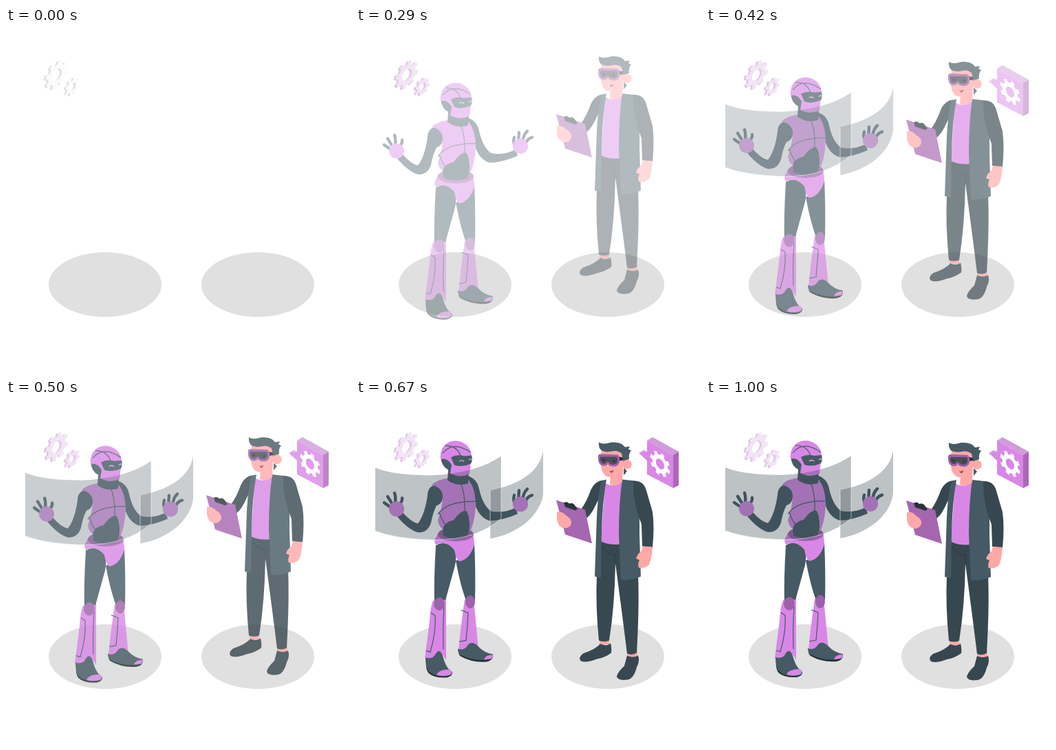
Write an HTML page that moves like this. It is 500 by 500 pixels and loops after 1.04 s.

```html
<!DOCTYPE html>
<html lang="en">
<head>
<meta charset="utf-8">
<title>Robot and engineer</title>
<style>
html, body { margin: 0; height: 100%; overflow: hidden; background: #fff; }
svg { display: block; width: 100%; height: 100%; }
.dark { fill: #455a64; }
.deep { fill: #37474f; }
.black { fill: #263238; }
.pink { fill: #d887e6; }
.plum { fill: #9c61aa; }
.skin { fill: #ffa8a7; }
.white { fill: #fff; }
.seam { fill: none; stroke: #455a64; stroke-width: 1.2; }
.finger { fill: none; stroke: #455a64; stroke-width: 4.4; stroke-linecap: round; }
.glass { fill: #37474f; fill-opacity: .33; }
.rim { fill: none; stroke: #fff; stroke-opacity: .55; }
</style>
</head>
<body>
<svg viewBox="0 0 500 500">
  <g fill="#e0e0e0">
    <ellipse cx="144" cy="373" rx="82" ry="47"/>
    <ellipse cx="366" cy="373" rx="82" ry="47"/>
  </g>
  <g id="cogs"></g>

  <g id="robot">
    <!-- legs -->
    <path class="dark" d="M145 233Q165 228 172 207Q174 250 173 290L160 291Q152 270 145 233Z"/>
    <path class="dark" d="M116 211Q130 202 143 217Q147 226 144 240L131 287L130 297H114Q113 260 116 211Z"/>
    <path class="pink" d="M158 289Q152 330 149 363Q156 368 161 358Q168 353 178 362L171 289Z"/>
    <path class="pink" d="M112 291Q108 300 107 320L100 375Q110 381 116 370Q125 365 131 378V290Z"/>
    <path class="seam" d="M153 305L163 309Q162 330 160 349L150 351M109 309L115 313Q116 330 112 350L108 366L102 364M128 300Q126 330 127 362"/>
    <ellipse class="plum" cx="121" cy="296" rx="8" ry="9.5"/>
    <ellipse class="plum" cx="166" cy="293" rx="7" ry="9.5"/>
    <!-- boots -->
    <path class="black" d="M149 365Q149 370 152 372Q170 382 190 380Q199 378 199 371Z"/>
    <path class="dark" d="M148 361Q148 368 152 370Q170 379 190 377Q199 375 199 369Q186 367 177 357Q167 348 161 358Q156 364 148 361Z"/>
    <path class="pink" d="M186 377Q188 370 198 370Q200 374 195 376Z"/>
    <path class="black" d="M102 380Q101 390 105 396Q113 404 132 403Q140 401 140 396Z"/>
    <path class="dark" d="M101 374Q101 387 105 393Q113 402 132 401Q140 399 140 395Q132 390 128 378Q123 358 116 368Q112 377 101 374Z"/>
    <path class="pink" d="M117 399Q120 391 137 391Q141 397 137 399Q125 402 117 399Z"/>
    <!-- hips and waist -->
    <path class="pink" d="M117 198Q120 189 127 187L166 187Q172 195 172 210Q165 232 150 234Q145 231 143 217Q130 203 116 210Q112 204 117 198Z"/>
    <ellipse class="plum" cx="145" cy="195" rx="26" ry="10"/>
    <path class="dark" d="M126 184Q128 176 142 172Q152 158 160 160Q166 166 165 186L162 197Q145 205 127 197Z"/>
    <!-- arms -->
    <path class="dark" d="M160 109Q176 113 179 129Q184 152 196 161Q214 165 232 156L235 165Q212 175 194 175Q178 170 172 148Z"/>
    <path class="dark" d="M104 138Q104 125 117 122Q128 125 126 143Q124 151 117 153Q112 162 109 178Q104 193 90 192Q76 188 60 169L67 162Q80 177 90 179Q100 166 104 138Z"/>
    <!-- chest -->
    <path class="pink" d="M110 123Q118 115 134 113L163 115Q173 126 174 150Q173 178 165 192Q166 165 160 160Q152 160 142 174Q128 177 126 187Q120 183 119 174Q125 158 126 140Q126 127 110 123Z"/>
    <path class="seam" d="M151 117Q159 135 158 160M119 166Q132 146 174 147M121 162Q124 174 131 182"/>
    <!-- head -->
    <path class="dark" d="M123 82Q124 96 134 101L133 116Q146 126 163 121L164 100Z"/>
    <path class="pink" d="M123 86C121 69 132 58 147 59C161 61 168 71 168 82L165 107Q151 114 137 106L139 94Q132 82 123 86Z"/>
    <path class="dark" d="M138 83Q146 78 157 81L168 80Q170 87 167 92Q155 98 143 94Z"/>
    <path class="seam" d="M126 77Q141 58 167 76M130 66Q147 66 152 81"/>
    <path d="M150 89Q153 86 157 89M164 87Q167 84 169 87" fill="none" stroke="#e8a8f0" stroke-width="1.4"/>
    <!-- hands -->
    <path class="finger" d="M51 156L41 149M53 151L46 140M57 150Q58 140 56 135M63 152Q68 146 67 142M231 150Q228 144 230 138M236 146L237 131M242 146Q243 134 249 129M246 149Q248 140 256 138"/>
    <circle class="pink" cx="59" cy="158" r="11"/>
    <circle class="pink" cx="239" cy="151" r="11"/>
    <g id="screens">
      <path class="glass" d="M28 98Q54 109 110 109Q175 106 211 81V172Q175 203 115 203Q60 202 28 190Z"/>
      <path class="glass" d="M195 131C240 122 268 102 272 73V136C268 168 235 194 195 201Z"/>
      <path class="rim" d="M211 81V172Q175 203 115 203Q60 202 28 190M195 131V201"/>
    </g>
  </g>

  <g id="man">
    <!-- legs -->
    <path class="skin" d="M354 345H368V356H354ZM394 364H409V376H394Z"/>
    <path class="deep" d="M355 355Q365 359 370 354Q372 362 371 368Q362 375 350 377Q335 383 327 380Q322 375 330 369Q348 363 355 355Z"/>
    <path class="deep" d="M394 372Q402 376 410 372Q413 380 408 389Q404 405 395 407Q380 409 379 402Q381 395 390 387Z"/>
    <path class="deep" d="M356 205L384 208L410 255Q412 300 408 368Q401 372 394 369Q388 320 377 238Q376 300 368 350Q360 353 353 350Q348 300 350 255Z"/>
    <path d="M357 213Q364 224 377 226L378 240" fill="none" stroke="#263238" stroke-width=".7"/>
    <!-- body -->
    <path class="deep" d="M360 117Q347 118 341 132Q335 149 326 161L331 175Q340 170 346 158L354 142Z"/>
    <path class="pink" d="M362 121Q374 129 387 119L384 210Q369 212 356 206Z"/>
    <path class="dark" d="M364 116L357 118Q352 134 350 170L347 257L356 259L357 195Q358 150 364 116Z"/>
    <path class="dark" d="M387 116L405 118Q413 140 412 195L414 257Q402 263 385 262L382 195Q382 150 387 116Z"/>
    <path class="deep" d="M403 118Q418 117 422 132L431 163Q434 185 431 215L416 213L415 181Q402 150 403 118Z"/>
    <path class="skin" d="M417 213L431 214Q430 230 426 240Q419 246 411 244Q409 240 412 233L407 231Q409 224 415 220Z"/>
    <!-- head -->
    <path class="skin" d="M370 106L388 100L387 119Q378 128 369 123Z"/>
    <path class="skin" d="M357 70L356 97Q358 110 366 112Q378 114 386 105L391 88L388 70Z"/>
    <path class="dark" d="M353 62Q359 66 371 62Q386 61 391 69L398 68L396 72L400 74Q396 78 397 86L389 91L386 78Q380 73 372 75Q364 77 357 74Q352 70 353 62ZM389 99L394 104L389 110Z"/>
    <circle class="skin" cx="394" cy="94" r="6.8"/>
    <path class="black" d="M382 83L388 84V88L382 89Z"/>
    <path class="plum" d="M352 82Q352 79 356 79L380 80Q384 82 383 91Q381 98 373 97Q368 97 366 93Q364 97 358 96Q351 94 352 82Z"/>
    <path d="M355 83L379 83Q381 86 380 91Q377 95 372 94Q368 93 367 90L364 91Q361 95 357 92Q354 89 355 83Z" fill="#4a4d55"/>
    <g class="black"><circle cx="360" cy="88" r="1.6"/><circle cx="375" cy="89" r="1.6"/></g>
    <path d="M368 103Q371 105 374 102Q374 107 370 106Z" fill="#8c4a55"/>
    <!-- clipboard -->
    <path d="M291 146L333 160L343 209L304 196Z" fill="#a566b0"/>
    <path class="black" d="M302 150Q306 147 310 151Q316 149 319 155L322 159L319 161L304 156Z"/>
    <path class="skin" d="M292 163Q300 162 305 168Q314 173 313 180Q311 187 302 187Q293 184 292 174Z"/>
  </g>

  <g id="bubble">
    <path d="M423 59L431 54L469 75L461 80ZM411 77L418 73L423 75Z" fill="#cf9cd9"/>
    <path d="M461 80L469 75V124L461 128Z" fill="#ad67b8"/>
    <path class="pink" d="M423 59L461 80V128L423 108V88L411 77L423 75Z"/>
  </g>
</svg>
<script>
const $ = id => document.getElementById(id);

// Toothed wheel of unit radius with a round hole
function wheel(hole) {
  let d = "";
  for (let i = 0; i < 8; i++)
    for (const [turn, r] of [[-.3, .76], [-.21, 1], [.21, 1], [.3, .76]]) {
      const a = (i + turn + .35) * Math.PI / 4;
      d += (d ? "L" : "M") + r * Math.cos(a) + " " + r * Math.sin(a);
    }
  return d + `ZM${hole} 0A${hole} ${hole} 0 1 0 ${-hole} 0A${hole} ${hole} 0 1 0 ${hole} 0Z`;
}

// Wheel on a slanted plane; tilt is the vertical shear
const cog = (x, y, r, tilt, cls, hole = .42) =>
  `<path class="${cls}" fill-rule="evenodd" d="${wheel(hole)}" transform="matrix(${.87 * r} ${tilt * r} 0 ${r} ${x} ${y})"/>`;

for (const [x, y, r] of [[74, 68, 19], [97, 85, 12]])
  $("cogs").innerHTML += cog(x - 3, y + 1, r, -.5, "side") + cog(x, y, r, -.5, "face");
$("bubble").innerHTML += cog(442, 93, 17, .5, "white");

// cubic-bezier(.36, -.01, .5, 1.38)
function ease(t) {
  const curve = (s, a, b) => 3 * (1 - s) ** 2 * s * a + 3 * (1 - s) * s * s * b + s ** 3;
  let lo = 0, hi = 1;
  for (let i = 0; i < 30; i++) {
    const mid = (lo + hi) / 2;
    if (curve(mid, .36, .5) < t) lo = mid; else hi = mid;
  }
  return curve(lo, -.01, 1.38);
}

const clamp = v => Math.min(1, Math.max(0, v));

function slide(id, from, p) {
  $(id).setAttribute("transform", `translate(0 ${from * (1 - p)})`);
  $(id).setAttribute("opacity", clamp(p) ** .75);
}

const start = performance.now();

function draw() {
  const ms = (performance.now() - start) % 1040;
  const step = Math.min(24, Math.floor((ms + 5) * 24 / 1000));
  const p = step ? ease(step / 24) : 0;
  slide("robot", 30, p);
  slide("man", -30, p);
  // The screens pop in once the robot is well visible
  $("screens").setAttribute("opacity", p < .35 ? 0 : 1);
  $("bubble").setAttribute("opacity", clamp((p - .32) / .53));
  for (const el of $("cogs").children) {
    const side = el.classList.contains("side");
    el.setAttribute("fill", step ? (side ? "#dfc8e4" : "#f3e4f5") : (side ? "#e0e0e0" : "#fbfbfb"));
  }
  requestAnimationFrame(draw);
}
draw();
</script>
</body>
</html>
```
